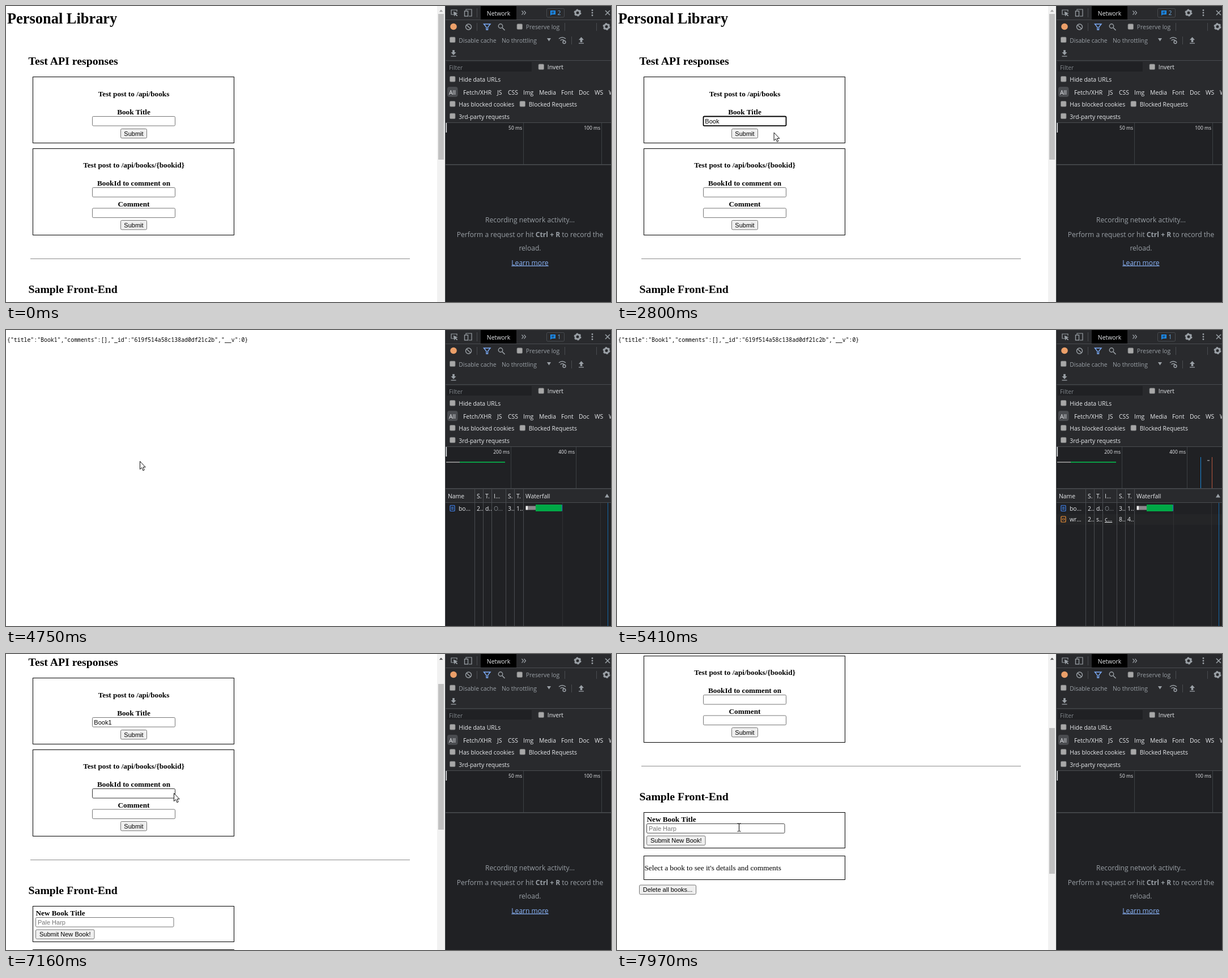
An HTML page that plays this animation: 1068x524 px, repeating every 8 s.

```html
<!DOCTYPE html>
<html lang="en">
<head>
<meta charset="utf-8">
<title>Personal Library</title>
<style>
html, body { margin: 0; width: 100%; height: 100%; overflow: hidden; background: #fff; }
svg { display: block; width: 1068px; height: 524px; }
text { white-space: pre; }
.serif { font-family: "Liberation Serif", serif; font-size: 13.24px; }
.b { font-weight: bold; }
.ui { font-family: "Liberation Sans", sans-serif; font-size: 11.03px; }
.dev { font-family: "Open Sans", sans-serif; font-size: 10.4px; fill: #e8eaed; }
.mono { font-family: "Noto Sans Mono", monospace; font-size: 9.85px; }
</style>
</head>
<body>
<svg id="stage" viewBox="0 0 1068 524"></svg>
<script>
const LOOP = 8000;
const GREY = '#9aa0a6', PANEL = '#292a2d', DARK = '#202124', LINE = '#494c50';

const rect = (x, y, w, h, fill, more = '') =>
  `<rect x="${x}" y="${y}" width="${w}" height="${h}" fill="${fill}" ${more}/>`;
const text = (x, y, s, cls, more = '') => `<text x="${x}" y="${y}" class="${cls}" ${more}>${s}</text>`;
const mid = (x, y, s, cls, more = '') => text(x, y, s, cls, 'text-anchor="middle" ' + more);
const path = (d, color, w = 1.2, fill = 'none') =>
  `<path d="${d}" stroke="${color}" stroke-width="${w}" fill="${fill}"/>`;
const group = (id, body, more = '') => `<g id="${id}" ${more}>${body}</g>`;

// Web page parts
const frame = (y, h) => rect(47.5, y + .5, 355, h, 'none', 'stroke="#000"');
const field = (id, x, y, w) =>
  rect(x + .5, y + .5, w - 1, 16.6, '#fff', `id="${id}" rx="1.8" stroke="#767676"`);
const button = (id, x, y, w, s) =>
  rect(x + .5, y + .5, w - 1, 16.4, '#efefef', `id="${id}" rx="2" stroke="#767676"`) +
  mid(x + w / 2, y + 12.6, s, 'ui');
const label = (y, s) => mid(225.5, y, s, 'serif b');
const h2 = (y, s) => text(39.5, y, s, 'serif b', 'style="font-size:19.8px"');

const page = group('page',
  text(2, 30.5, 'Personal Library', 'serif b', 'style="font-size:26.4px"') +
  h2(103.5, 'Test API responses') +
  frame(125, 117) + label(160, 'Test post to /api/books') + label(192, 'Book Title') +
  field('title', 152, 195, 147) +
  text(155.3, 207.8, '', 'ui', 'id="typed"') +
  rect(0, 198, 1, 12, '#000', 'id="caret"') +
  button('send', 202, 217, 47, 'Submit') +
  frame(252, 153) + label(286, 'Test post to /api/books/{bookid}') +
  label(318, 'BookId to comment on') + field('bookid', 152, 321, 147) +
  label(354.5, 'Comment') + field('comment', 152, 357.5, 147) +
  button('send2', 202, 379, 47, 'Submit') +
  rect(43, 447, 670, 1, '#8c8c8c') +
  h2(507.5, 'Sample Front-End') +
  frame(529, 63) + text(52.5, 545.5, 'New Book Title', 'serif b') +
  field('fresh', 52, 549, 244.5) +
  text(56, 561.5, 'Pale Harp', 'ui', 'fill="#757575"') +
  button('add', 52, 570.5, 104.5, 'Submit New Book!') +
  frame(606, 42) +
  text(48.5, 632, 'Select a book to see it\'s details and comments', 'serif') +
  button('wipe', 39, 657.5, 101, 'Delete all books...'));

const scrollbar = group('bar',
  rect(761, 0, 14, 524, '#f1f1f1') +
  '<path id="up" d="M764.8 10.2L768 6.6L771.2 10.2Z"/>' +
  rect(763, 14, 10, 258, '#c1c1c1', 'id="thumb"'));

const answer = group('answer',
  text(2, 20.8, '{"title":"Book1","comments":[],"_id":"619f514a58c138ad0df21c2b","__v":0}', 'mono'));

// Developer tools parts
const box = (x, y) => rect(x, y, 9.5, 9.5, '#a8a8a8', 'rx="1.5" stroke="#77797c" stroke-width=".8"');
const check = (x, y, s, color = '#e8eaed') =>
  box(x, y - 9.4) + text(x + 15.8, y, s, 'dev', `style="fill:${color}"`);
const vline = (x, y, h, color = '#3c4043') => rect(x, y, 1, h, color);
const gear = (x, y) =>
  `<circle cx="${x}" cy="${y}" r="4" fill="none" stroke="${GREY}" stroke-width="3"/>` +
  `<circle cx="${x}" cy="${y}" r="5.6" fill="none" stroke="${GREY}" stroke-width="1.8" stroke-dasharray="3 2.86"/>`;

const icons =
  path('M794 15H786V7H796V10', GREY) + path('M790 10L797 13L794 14L797 17L796 18L793 15L791.5 18Z', GREY, .5, GREY) +
  path('M812 8V6H822V18H817', GREY) + rect(809.5, 9, 6, 9, PANEL, `stroke="${GREY}" stroke-width="1.3"`) +
  path('M910.5 8.5L913.5 12L910.5 15.5M914.5 8.5L917.5 12L914.5 15.5', GREY) +
  gear(1009, 12) + gear(1060, 36.5) +
  [7.5, 12, 16.5].map(y => `<circle cx="1035" cy="${y}" r="1.4" fill="${GREY}"/>`).join('') +
  path('M1058 8L1066 16M1066 8L1058 16', GREY, 1.6) +
  '<circle cx="790" cy="36.5" r="5.8" fill="#eb9f69"/>' +
  `<circle cx="816.5" cy="37" r="5" fill="none" stroke="${GREY}" stroke-width="1.4"/>` +
  path('M813 33.5L820 40.5', GREY, 1.4) +
  path('M843.5 32H855L850.5 37.5V42H848V37.5Z', '#7cacf8', 1.4) +
  `<circle cx="873" cy="35.5" r="3.7" fill="none" stroke="${GREY}" stroke-width="1.4"/>` +
  path('M876 38.5L880.5 43', GREY, 1.7) +
  path('M955 57H962L958.5 62.5Z', 'none', 0, GREY) +
  path('M976 58Q982 53 988 58M978.5 61Q982 58 985.5 61', GREY, 1.5) +
  `<circle cx="985.5" cy="64" r="2.4" fill="none" stroke="${GREY}" stroke-width="1.5"/>` +
  path('M1015.5 55L1020 60H1017.3V64H1013.7V60H1011Z', 'none', 0, GREY) + rect(1011, 65.3, 9, 1.3, GREY) +
  path('M790 87L794.5 82H791.8V78H788.2V82H785.5Z', 'none', 0, GREY) + rect(785.5, 88.3, 9, 1.3, GREY);

const kinds = [[807, 'Fetch/XHR'], [867, 'JS'], [886, 'CSS'], [913, 'Img'], [941, 'Media'],
  [980, 'Font'], [1011, 'Doc'], [1039, 'WS'], [1064, 'Wasm']];

const tick = (x, s) => vline(x, 207, 73) + text(x - 2, 219, s, 'dev', 'text-anchor="end" style="font-size:8.5px"');
const note = (y, s) => mid(925, y, s, 'dev', 'style="font-size:12.1px;fill:#9aa0a6"');

const idle = group('idle',
  note(382.5, 'Recording network activity...') +
  note(408.5, 'Perform a request or hit <tspan font-weight="bold">Ctrl + R</tspan> to record the') +
  note(433, 'reload.') +
  mid(925, 458.5, 'Learn more', 'dev', 'style="font-size:12.1px;fill:#8ab4f8" text-decoration="underline"'));

const cols = [780, 831, 846, 861, 886, 901, 917];
const cells = (y, list, from = 0) =>
  list.map((s, i) => text(cols[i] + (i ? 0 : from), y, s, 'dev',
    s === 'O...' ? 'style="fill:#80868b"' : s === 'c...' ? 'text-decoration="underline"' : '')).join('');
const sheet = (y, color, d) =>
  rect(784, y - 10, 8, 10, 'none', `rx="1" stroke="${color}" stroke-width="1.2"`) + path(d, color, 1);

const table = group('table',
  rect(776, 282, 292, 23, PANEL) + rect(776, 305, 292, 1, LINE) +
  cells(297.5, ['Name', 'S.', 'T.', 'I...', 'S.', 'T.', 'Waterfall']) +
  path('M1057 296.5L1061 290L1065 296.5Z', 'none', 0, GREY) +
  group('row2', rect(776, 326, 292, 19, '#242527') +
    sheet(340, '#f29339', 'M787.5 333L786 335L787.5 337M788.5 333L790 335L788.5 337') +
    cells(339, ['wr...', '2..', 's..', 'c...', '8..', '4..'], 19)) +
  sheet(320.5, '#4285f4', 'M786 313.5H790M786 315.5H790M786 317.5H790') +
  group('row1', cells(319.5, ['', '2..', 'd..', 'O...', '3..', '1..']) +
    vline(982, 306, 218, '#303134') + vline(1049, 306, 218, '#303134') +
    rect(917.5, 311.5, 4, 7, '#f1f1f1') + rect(921.5, 311.5, 13.5, 7, '#8b878b') +
    rect(935, 309, 46, 12, '#00a846') + rect(981, 309.5, 1, 11, '#1a73c8')) +
  text(799, 319.5, 'bo...', 'dev') +
  [827, 842, 857, 882, 897, 913].map(x => vline(x, 282, 242, LINE)).join('') +
  vline(1062, 306, 218, '#1566a8'));

const tools = group('tools',
  rect(775, 0, 293, 524, DARK) + rect(776, 0, 292, 207, PANEL) +
  rect(838, 0, 63, 24, '#000') + mid(869.5, 16.5, 'Network', 'dev') +
  rect(776, 24, 292, 1, LINE) + vline(831, 4, 16, LINE) + icons +
  group('badge', rect(954.5, 4.5, 31, 15.5, 'none', `rx="2" stroke="${LINE}"`) +
    path('M961 8H970V15H963.5L961 17Z', 'none', 0, '#1a8cf0') + path('M963 10.5H968M963 12.5H967', PANEL, 1) +
    text(973.5, 16.3, '', 'dev', 'id="count" style="fill:#6fb0e8"')) +
  vline(831, 30, 14, LINE) + vline(986, 30, 14, LINE) + vline(1042, 30, 14, LINE) + vline(998, 54, 14, LINE) +
  check(902, 41.2, 'Preserve log', GREY) + check(783.5, 64.5, 'Disable cache', GREY) +
  text(875, 64.5, 'No throttling', 'dev', 'style="fill:#9aa0a6"') +
  rect(776, 96, 292, 1, LINE) +
  rect(778, 99, 150, 17, DARK) + text(782, 112.5, 'Filter', 'dev', 'style="fill:#80868b"') +
  check(940, 112.3, 'Invert') + check(783.5, 134, 'Hide data URLs') +
  rect(779, 143, 18.5, 18, '#4a4c50', 'rx="4"') + text(782, 156.5, 'All', 'dev') +
  kinds.map(([x, s]) => text(x, 156.5, s, 'dev')).join('') +
  check(783.5, 178, 'Has blocked cookies') + check(907, 178, 'Blocked Requests') +
  check(783.5, 199.5, '3rd-party requests') +
  rect(776, 206, 292, 1, LINE) +
  group('short', tick(913, '50 ms') + tick(1051, '100 ms')) +
  group('long', tick(891, '200 ms') + tick(1006, '400 ms') +
    rect(777, 233, 24, 2, '#858585') + rect(801, 233, 80, 2, '#0b9d45')) +
  group('marks', rect(1042, 230, 4, 2, '#74777b') + vline(1030, 225, 55, '#1a87d7') + vline(1050, 225, 55, '#b5573e')) +
  rect(776.5, 207, 1.6, 17, '#e8eaed') +
  rect(776, 280, 292, 1.6, LINE) +
  idle + table + vline(775, 0, 524, '#3c4043'));

const pointers =
  group('arrow', '<path d="M.5 .5V14.6L3.7 11.6L5.9 16.8L8.2 15.8L6 10.8H10.2Z" fill="#fff" stroke="#000" stroke-width=".95"/>') +
  group('beam', path('M-3 -7H-.8L0 -6.2L.8 -7H3M-3 7H-.8L0 6.2L.8 7H3M0 -6.5V6.5', '#000', 1));

document.getElementById('stage').innerHTML =
  rect(0, 0, 1068, 524, '#fff') + page + scrollbar + answer + tools + pointers;

const el = {};
document.querySelectorAll('[id]').forEach(n => el[n.id] = n);
const show = (id, on) => el[id].setAttribute('display', on ? 'inline' : 'none');
const set = (id, attrs) => { for (const k in attrs) el[id].setAttribute(k, attrs[k]); };

const beats = [[0, 0, 1], [70, 870, 12], [950, 1080, 3], [1470, 1470, 1], [1670, 1670, 1], [2020, 2020, 1],
  [2160, 2280, 2], [2800, 2800, 1], [3210, 3210, 1], [3740, 3740, 1], [3950, 4540, 9], [4750, 4950, 4],
  [5280, 5410, 3], [6270, 7010, 12], [7090, 7890, 13], [7970, 7970, 1]]
  .flatMap(([a, b, n]) => Array.from({ length: n }, (_, i) => a + (n > 1 ? i * (b - a) / (n - 1) : 0)));
const snap = t => beats.filter(b => b <= t + 7).pop();

// Pointer: time, x, y, shape
const route = [[0, 893, 498, ''], [70, 893, 498, 'arrow'], [300, 690, 395, 'arrow'], [550, 420, 265, 'arrow'],
  [870, 258, 204, 'beam'], [950, 258, 204, 'beam'], [1080, 279, 223, 'arrow'], [3950, 275, 224, 'arrow'],
  [4165, 234, 233, 'arrow'], [4245, 234, 233, 'arrow'], [4315, 232, 229, 'arrow'], [4540, 234, 231, 'arrow'],
  [4750, 236, 232, 'arrow'], [4816, 268, 243, 'arrow'], [4950, 337, 15, 'arrow'], [5270, 337, 15, 'arrow'],
  [5280, 342, 23, 'beam'], [5410, 342, 23, ''], [6400, 330, -12, 'arrow'], [6870, 302, 252, 'arrow'],
  [7010, 299, 249, 'arrow'], [7150, 296, 246, 'arrow'], [7480, 296, 246, 'arrow'], [7600, 280, 240, 'arrow'],
  [7890, 215, 305, 'arrow'], [7970, 215.5, 307, 'beam'], [8000, 215.5, 307, 'beam']];
// Three wheel notches of 83 px
const wheel = [[0, 0], [7020, 0], [7150, 83], [7250, 83], [7360, 166], [7400, 166], [7500, 249], [8000, 249]];

function along(keys, t) {
  const i = Math.max(1, keys.findIndex(k => k[0] > t));
  const a = keys[i - 1], b = keys[i];
  const p = Math.min(1, (t - a[0]) / (b[0] - a[0]));
  return a.map((v, j) => typeof v === 'number' ? v + (b[j] - v) * p : v);
}

const keystrokes = [1670, 2020, 2160, 2280, 3210];
const ends = [0, 7.4, 13.5, 19.6, 25.1, 31.3];
const caretOn = [[950, 1470], [1670, 2800], [3210, 3740], [4165, 4300]];
const within = (t, a, b) => t >= a && t < b;

function draw(time) {
  const t = snap(time);
  const json = within(t, 4750, 6270), busy = within(t, 4540, 6270);
  const scroll = along(wheel, t)[1];
  const [, x, y, shape] = along(route, t);

  show('page', !json);
  show('bar', !json);
  show('answer', json);
  set('page', { transform: `translate(0 ${-scroll})` });
  set('thumb', { y: 14 + scroll * .47 });
  set('up', { fill: scroll ? '#505050' : '#a3a3a3' });

  const typed = keystrokes.filter(k => k <= t).length;
  el.typed.textContent = 'Book1'.slice(0, typed);
  show('caret', caretOn.some(([a, b]) => within(t, a, b)));
  set('caret', { x: 155.3 + ends[typed] });

  const focus = within(t, 950, 4300);
  set('title', { stroke: focus || within(t, 860, 950) ? '#000' : '#767676', 'stroke-width': focus ? 1.8 : 1 });
  set('send', { fill: within(t, 4300, 4400) ? '#f5f5f5' : within(t, 4165, 4750) ? '#e5e5e5' : '#efefef' });
  set('bookid', { stroke: within(t, 7150, 7250) ? '#333' : '#767676' });
  set('fresh', { stroke: t >= 7970 ? '#444' : '#767676' });

  show('badge', t < 6270);
  el.count.textContent = t < 4750 ? '2' : '1';
  show('idle', !busy);
  show('table', busy);
  show('row1', t >= 4750);
  show('row2', t >= 4880);
  show('short', !json);
  show('long', json);
  show('marks', json && t >= 4950);

  for (const id of ['arrow', 'beam']) {
    show(id, id === shape);
    set(id, { transform: `translate(${x.toFixed(1)} ${y.toFixed(1)})` });
  }
}

const start = performance.now();
function loop() {
  draw((performance.now() - start) % LOOP);
  requestAnimationFrame(loop);
}
loop();
</script>
</body>
</html>
```
